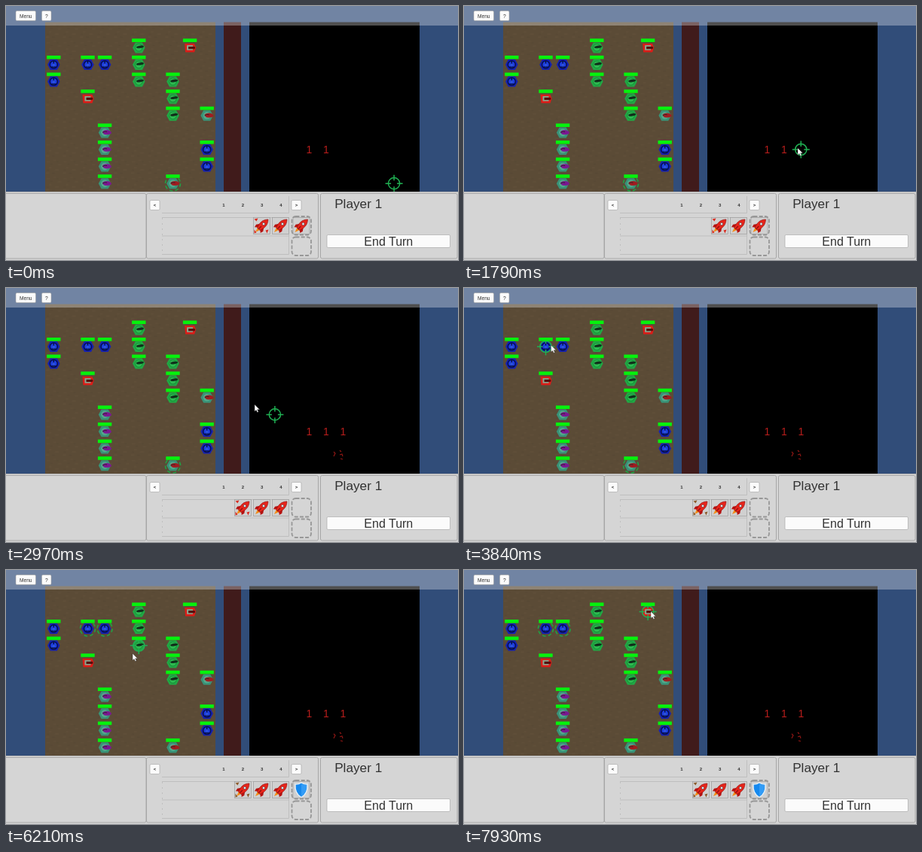
Animation, 600 px wide and 338 px high, one loop 8 s. Source, as an HTML page:

```html
<!DOCTYPE html>
<html lang="en">
<head>
<meta charset="utf-8">
<title>Board battle</title>
<style>
html, body { margin: 0; width: 100%; height: 100%; overflow: hidden; background: #314d79; }
svg { display: block; width: 100vw; height: 100vh; }
text { font-family: "Liberation Sans", Arial, sans-serif; fill: #323232; text-anchor: middle; }
.bold { font-weight: bold; font-size: 6px; }
.hit { font-size: 14px; fill: #b51d1b; }
.button { fill: #fbfbfb; stroke: #a2a2a2; stroke-width: .6; }
.frame { fill: none; stroke: #a3a3a3; stroke-width: .9; }
.thin { fill: none; stroke: #b9b9b9; stroke-width: .8; }
.slot { fill: none; stroke: #979797; stroke-width: 1.8; stroke-dasharray: 5 2.2; }
.ring { fill: none; stroke: #20a345; stroke-width: 1.6; stroke-dasharray: 4.6 3.25; }
</style>
</head>
<body>
<svg viewBox="0 0 600 338" preserveAspectRatio="none">
  <defs>
    <polygon id="hex" points="-8.3,0 -4.5,-7 4.5,-7 8.3,0 4.5,7 -4.5,7"/>
    <g id="blue">
      <use href="#hex" fill="#1420b4"/>
      <circle r="5" fill="#1c3ce0" stroke="#07104e" stroke-width="1.5"/>
      <path d="M-3 3.2H3M0-5V0" stroke="#060d3c" stroke-width="1.3"/>
      <circle r="2" cy=".4" fill="#2b52dc"/>
    </g>
    <g id="green">
      <use href="#hex" fill="#20a944"/>
      <circle r="4.7" fill="#2dbb50" stroke="#168234" stroke-width=".8"/>
      <ellipse cx="1.8" cy="-.8" rx="5" ry="1.7" transform="rotate(-8)" fill="#10301b"/>
    </g>
    <g id="red">
      <path d="M-7-5.5H6L8 0 6 6H-6Z" fill="#dc1c18"/>
      <rect x="-4" y="-3.2" width="8" height="6.6" fill="#8aa68f"/>
      <path d="M-2-1.5H6Q8 0 6 1.8H-2Z" fill="#54100f"/>
    </g>
    <g id="gun">
      <use href="#hex" fill="#389378"/>
      <circle r="4.8" fill="#55a98c"/>
      <path d="M-3-1.5Q0-4 5-3Q9-2 8.8 1Q7 3 2 2.8Q-3 2.5-3-1.5Z" fill="currentColor"/>
      <path d="M-3 0Q0-2.3 3-1" fill="none" stroke="#302329"/>
    </g>
    <g id="rocket">
      <rect x="-11" y="-11" width="22" height="22" fill="#d0d0d0" stroke="#a2a2a2" stroke-width=".8"/>
      <g transform="rotate(45)">
        <path d="M-2.5 5L0 12 2.5 5Z" fill="#f58a13"/>
        <path d="M-3-1L-6.5 4-5.5 8-2.5 5.5H2.5L5.5 8 6.5 4 3-1Z" fill="#b51312"/>
        <path d="M0-12Q5.2-7 4 1L2.6 6H-2.6L-4 1Q-5.2-7 0-12Z" fill="#e7241a" stroke="#8c1110" stroke-width=".6"/>
        <circle cy="-3.5" r="1.8" fill="#dcebf2" stroke="#5b2222" stroke-width=".6"/>
        <path d="M0 1V6" stroke="#701010"/>
      </g>
    </g>
    <path id="sparks" d="M-10-9L-5-10-7-6ZM-10 5L-7 9-10 10ZM5 6L9 5 7 10Z"/>
    <pattern id="dirt" x="52" y="21.5" width="22.6" height="22.6" patternUnits="userSpaceOnUse">
      <rect width="23" height="23" fill="#5b4b36"/>
      <path d="M2 5h4M11 3h3M17 9h4M5 13h3M13 16h5M1 20h4" stroke="#65543c" opacity=".55"/>
      <path d="M7 8h3M15 5h3M2 16h3M9 20h4" stroke="#4f412f" opacity=".55"/>
    </pattern>
  </defs>

  <rect width="600" height="338" fill="#314d79"/>
  <rect x="52" y="21.5" width="226" height="226" fill="url(#dirt)"/>
  <rect x="289" y="21.5" width="23" height="226" fill="#401b1b"/>
  <rect x="323" y="21.5" width="226" height="226"/>
  <g id="units"></g>
  <g id="hits">
    <text class="hit" x="402.5" y="196">1</text>
    <text class="hit" x="425" y="196">1</text>
    <g id="shot">
      <text class="hit" x="447.5" y="196">1</text>
      <path d="M435 218l2 2-2 4M443 216l2 2M443 222l3-1 1 3M444 227l3 1" fill="none" stroke="#8f1714" stroke-width="1.2"/>
    </g>
  </g>
  <g id="rings"></g>
  <g id="target" fill="none" stroke="#20b153" stroke-width="1.5">
    <circle r="7.6"/>
    <path d="M0-11.5V-4M0 11.5V4M-11.5 0H-4M11.5 0H4"/>
  </g>
  <g id="bars" fill="#05f20d"></g>

  <rect width="600" height="26" fill="#fff" opacity=".31"/>
  <rect class="button" x="13" y="6.5" width="26.5" height="13" rx="1.5"/>
  <text x="26.3" y="15.5" font-size="6.6">Menu</text>
  <rect class="button" x="47.5" y="6.5" width="12.5" height="13" rx="1.5"/>
  <text x="53.8" y="15.5" font-size="6.6">?</text>

  <rect y="247" width="600" height="91" fill="#d5d5d5"/>
  <path d="M0 247.5H600" stroke="#b4b4b4"/>
  <rect class="frame" x="-3" y="249.5" width="189" height="86.5" rx="2"/>
  <rect class="frame" x="186.5" y="249.5" width="228" height="86.5" rx="2"/>
  <rect class="frame" x="417.5" y="249.5" width="181.5" height="86.5" rx="2"/>
  <path class="thin" d="M207 275.5H375.5V253M207 281.5H375.5V330.5H207M207 306H375.5"/>
  <path class="thin" d="M207.5 282V330" stroke-dasharray="2 5"/>
  <rect class="button" x="191" y="258.5" width="13" height="13" rx="1.5"/>
  <text class="bold" x="197.5" y="267">&lt;</text>
  <rect class="button" x="379" y="258.5" width="13" height="13" rx="1.5"/>
  <text class="bold" x="385.5" y="267">&gt;</text>
  <g id="turns"></g>
  <g id="loaded">
    <use href="#rocket" x="339.5" y="292.5"/>
    <use href="#sparks" x="339.5" y="292.5" fill="#d92b20"/>
    <use href="#rocket" x="364.5" y="292.5"/>
    <use href="#rocket" x="392" y="292.5"/>
  </g>
  <g id="fired">
    <use href="#rocket" x="314.5" y="292.5"/>
    <use id="glow" href="#sparks" x="314.5" y="292.5"/>
    <use href="#rocket" x="339.5" y="292.5"/>
    <use href="#rocket" x="364.5" y="292.5"/>
  </g>
  <g id="shield" transform="translate(392 292.5)">
    <rect x="-11" y="-11" width="22" height="22" fill="#d0d0d0" stroke="#a2a2a2" stroke-width=".8"/>
    <path d="M0-9.5Q4-7 8-7.5Q9 5 0 10Q-9 5-8-7.5Q-4-7 0-9.5Z" fill="#1689ee" stroke="#e4eef5" stroke-width="1.4"/>
    <path d="M0-8Q4-6 7-6.5Q7.5 4 0 8.5Z" fill="#329cf6"/>
  </g>
  <rect class="slot" x="379.5" y="280" width="25.5" height="24.5" rx="5"/>
  <rect class="slot" x="379.5" y="307.5" width="25.5" height="24.5" rx="5"/>
  <text x="467.7" y="269" font-size="17.2">Player 1</text>
  <rect class="button" x="426" y="304.5" width="163.5" height="17" rx="1.5"/>
  <text x="507.8" y="318.8" font-size="16">End Turn</text>
  <path id="cursor" d="M0 0V9.3L2.1 7.4 3.6 10.5 5.1 9.8 3.7 6.8H6.7Z" fill="#fff" stroke="#222" stroke-width=".4"/>
</svg>
<script>
const LOOP = 8000, STEPS = 102, CELL = 22.6, TOP = 21.5, LEFT = 52, RIGHT = 323;
const FIRE = 28, GLOW = 40, GUARD = 68;
const $ = id => document.getElementById(id);
const center = (col, row, left = LEFT) => [left + (col + .5) * CELL, TOP + (row + .5) * CELL];
const show = (id, on) => $(id).setAttribute("visibility", on ? "visible" : "hidden");
const move = (id, [x, y]) => $(id).setAttribute("transform", `translate(${x} ${y})`);

// Each unit is "column row".
const squads = [
  ["blue", "", "02 22 32 03 97 98"],
  ["green", "", "51 52 53 73 74 75"],
  ["red", "", "81 24"],
  ["gun", "#a01c20", "95 79"],
  ["gun", "#7b1792", "36 37 38 39"]
];
for (const [kind, color, places] of squads) {
  for (const [col, row] of places.split(" ")) {
    const [x, y] = center(+col, +row);
    $("units").innerHTML += `<use href="#${kind}" x="${x}" y="${y}" color="${color}"/>`;
    $("bars").innerHTML += `<rect x="${x - 9.2}" y="${y - 12}" width="18.4" height="4.6"/>`;
  }
}
[1, 2, 3, 4].forEach(n => {
  $("turns").innerHTML += `<text class="bold" x="${263.7 + n * 25.3}" y="267">${n}</text>`;
});
const rings = [[7, 9], [2, 2], [3, 2]].map(place => {
  const [x, y] = center(...place);
  $("rings").insertAdjacentHTML("beforeend", '<circle class="ring" r="10"/>');
  return { x, y, node: $("rings").lastChild };
});

// Pointer path: step, x, y
const path = [
  [0, 505, 311], [1, 505, 311], [5, 480, 200], [7, 461, 135], [9, 468, 155], [11, 470, 185],
  [20, 465, 188], [23, 443, 189], [34, 443, 189], [37, 360, 165], [38, 330, 155],
  [41, 112, 102], [44, 254, 115], [46, 180, 95], [48, 112, 80], [49, 115.5, 76],
  [51, 115.5, 76], [53, 129, 76], [67, 129, 76], [72, 160, 95], [76, 168, 111],
  [89, 168, 111], [91, 220, 95], [94, 262, 60], [98, 248, 55], [102, 248, 55]
];
function pointer(step) {
  const i = path.findIndex(p => p[0] > step);
  const [s0, x0, y0] = path[i - 1], [s1, x1, y1] = path[i];
  const k = (step - s0) / (s1 - s0);
  return [x0 + (x1 - x0) * k, y0 + (y1 - y0) * k];
}

// The crosshair snaps to the last cell touched, one step behind the pointer.
function target(step) {
  for (let s = step - 1; s >= 0; s--) {
    const [x, y] = pointer(s);
    const left = x < 300 ? LEFT : RIGHT;
    const col = Math.floor((x - left) / CELL), row = Math.floor((y - TOP) / CELL);
    if (col >= 0 && col < 10 && row >= 0 && row < 10) return center(col, row, left);
  }
  return center(8, 9, RIGHT);
}

function draw(time) {
  const step = Math.min(STEPS - 1, Math.floor((time + 15) * STEPS / LOOP));
  move("cursor", pointer(step));
  move("target", target(step));
  show("cursor", step > 0);
  show("shot", step >= FIRE);
  show("loaded", step < FIRE);
  show("fired", step >= FIRE);
  show("shield", step >= GUARD);
  $("glow").setAttribute("fill", step < GLOW ? "#d92b20" : "#8b5a2b");
  rings.forEach(({ x, y, node }, i) => {
    node.setAttribute("transform", `translate(${x} ${y}) rotate(${step * 4})`);
    node.setAttribute("visibility", (i > 0) === (step >= GUARD) ? "visible" : "hidden");
  });
}

const start = performance.now();
function tick() {
  draw((performance.now() - start) % LOOP);
  requestAnimationFrame(tick);
}
tick();
</script>
</body>
</html>
```
